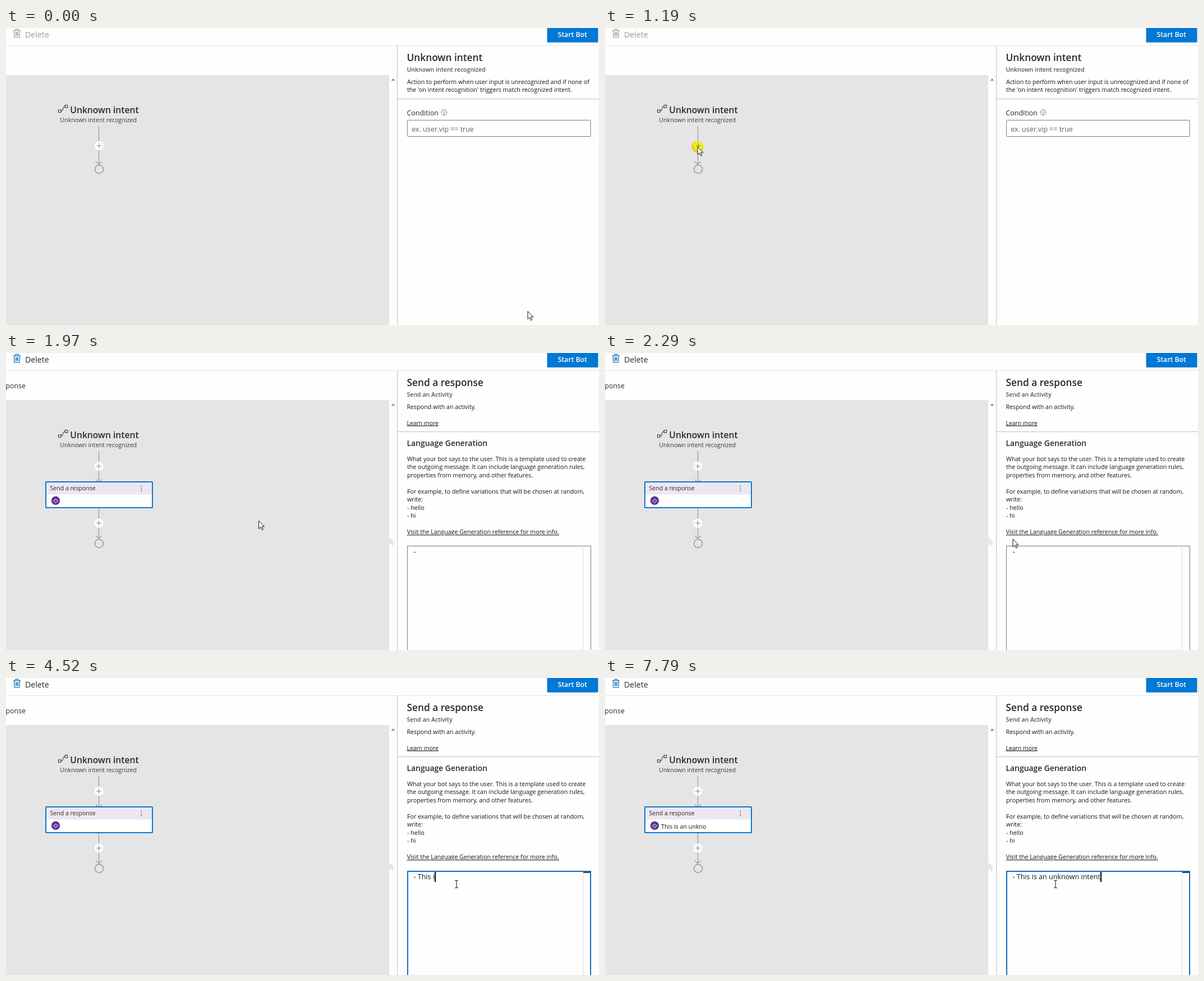
Recreate the animation shown at these times as an HTML page. Size 1057 by 530 pixels, loop 8000 ms.

```html
<!DOCTYPE html>
<html lang="en">
<head>
<meta charset="utf-8">
<title>Bot flow editor</title>
<style>
  html, body { margin: 0; width: 100%; height: 100%; overflow: hidden; background: #fefefe; }
  body { position: relative; font-family: "Open Sans", "Noto Sans", sans-serif; }
  svg { position: absolute; left: 0; top: 0; display: block; }
  text { fill: #292827; }
  .small { font-size: 10.68px; fill: #161514; }
  .sub { font-size: 10.55px; font-weight: 600; fill: #55534f; }
  .head { font-size: 17.3px; font-weight: 600; }
  .body { font-size: 12.45px; }
  .link { text-decoration: underline; }
  .wire { fill: none; stroke: #979797; stroke-width: 1.2; }
  .icon { fill: none; stroke: #3b3a39; stroke-width: 1.1; }
  .rule { stroke: #c2c0be; }
  #delete { --ink: #9c9a98; --mark: #a3a19f; }
  #delete.on { --ink: #292827; --mark: #1a73c4; }
  #delete text { fill: var(--ink); font-size: 14.1px; }
  #delete path { fill: none; stroke: var(--mark); stroke-width: 1.3; }
  #menu .box { filter: drop-shadow(0 3px 4px rgba(0, 0, 0, .22)); }
  #line {
    position: absolute; left: 726.5px; top: 346px; height: 18px;
    font-size: 12.5px; line-height: 18px; white-space: pre; color: #161514;
  }
  #caret { position: absolute; top: 0; width: 2px; height: 18px; background: #000; }
  #click { fill: #f6ef1e; mix-blend-mode: multiply; }
  .pointer { fill: #fff; stroke: #111; stroke-width: 1; stroke-linejoin: round; }
  .off { display: none; }
</style>
</head>
<body>
<svg width="1057" height="530" viewBox="0 0 1057 530">
  <defs>
    <g id="plus">
      <circle r="8" fill="#fff"/>
      <path d="M-4.5 0H4.5M0 -4.5V4.5" stroke="#5b8fc6"/>
    </g>
    <g id="end" class="wire">
      <path d="M-6 -14L-.5 -9L5 -14"/>
      <circle r="7.5" stroke-width="1.5"/>
    </g>
    <path id="arrow" d="M0 0V14L3.3 11L5.6 16.2L7.8 15.2L5.6 10.2H10Z"/>
  </defs>

  <!-- toolbar -->
  <g id="delete">
    <path d="M13 4.6H26M17 4.4V2.4H22V4.4M14.5 4.8L15 16.6H24L24.5 4.8M17.6 7.3V14M19.5 7.3V14M21.4 7.3V14"/>
    <text x="34" y="17">Delete</text>
  </g>
  <rect x="964.5" y="-2" width="91" height="27.8" rx="1" fill="#0078d4"/>
  <text x="983.5" y="16.3" font-size="12.25" font-weight="600" style="fill:#fff">Start Bot</text>
  <path d="M0 31.5H1057" stroke="#e3e2e1"/>

  <!-- canvas -->
  <rect y="84" width="683" height="446" fill="#e5e5e5"/>
  <path d="M686.5 94L690 90L693.5 94Z" fill="#8a8a8a"/>
  <path d="M697.5 31V530" class="rule"/>
  <g class="icon">
    <rect x="93.5" y="146" width="4.5" height="4.5"/>
    <rect x="105.2" y="137.7" width="4.5" height="4.5"/>
    <path d="M98 148.2C103.5 148.2 99.5 140 105 140"/>
  </g>
  <text x="114.3" y="152" font-size="15.7" font-weight="600">Unknown intent</text>
  <text x="96.3" y="167.5" class="small" style="fill:#3b3a39">Unknown intent recognized</text>

  <g id="before">
    <path class="wire" d="M165.5 175V243"/>
    <use href="#plus" x="166" y="210"/>
    <use href="#end" x="166" y="252"/>

    <text class="head" x="714.5" y="59">Unknown intent</text>
    <text class="sub" x="714.5" y="78">Unknown intent recognized</text>
    <text class="small" y="99.5">
      <tspan x="715">Action to perform when user input is unrecognized and if none of</tspan>
      <tspan x="715" dy="14.5">the 'on intent recognition' triggers match recognized intent.</tspan>
    </text>
    <path d="M698 126.5H1057" class="rule"/>
    <text class="body" x="714.5" y="155.5">Condition</text>
    <circle cx="781" cy="150.5" r="4.9" class="icon" style="stroke:#605e5c;stroke-width:.9"/>
    <text x="781" y="153.5" font-size="8" text-anchor="middle">?</text>
    <rect x="715.5" y="164.5" width="326.5" height="29" rx="1" fill="#fff" stroke="#7d7b79"/>
    <text class="body" x="723.3" y="185" style="fill:#605e5c">ex. user.vip == true</text>
  </g>

  <g id="after">
    <text x="-.5" y="63" font-size="12.3">ponse</text>
    <path class="wire" d="M165.5 175V230M160 226L165.5 231L171 226M165.5 277V331"/>
    <use href="#plus" x="165.5" y="202"/>
    <use href="#plus" x="165.5" y="303.5"/>
    <use href="#end" x="166" y="340"/>
    <rect x="71" y="230" width="190" height="46" fill="#fff"/>
    <rect x="71" y="230" width="190" height="22.5" fill="#ebe8f3"/>
    <rect x="71" y="230" width="190" height="46" rx="1" fill="none" stroke="#0f76cb" stroke-width="2"/>
    <text x="78.5" y="245.3" font-size="10.55">Send a response</text>
    <g fill="#484644">
      <circle cx="241.3" cy="237.7" r=".9"/><circle cx="241.3" cy="241.6" r=".9"/><circle cx="241.3" cy="245.5" r=".9"/>
    </g>
    <circle cx="88.5" cy="263.4" r="7.7" fill="#5c2d91"/>
    <path d="M85.8 261.7H91.2V265.7H85.8ZM84.2 262.7V264.7M92.8 262.7V264.7M88.5 261.7V259.2M87 267.7H90" fill="none" stroke="#d9cce8" stroke-width=".9"/>
    <text id="reply" class="small" x="100" y="268.5">This is an unkno</text>
    <use href="#arrow" x="683.5" y="329" fill="#e4e4e4"/>

    <text class="head" x="714.5" y="59">Send a response</text>
    <text class="sub" x="714.5" y="78">Send an Activity</text>
    <text class="small" x="714.5" y="99.5">Respond with an activity.</text>
    <text class="small link" x="714.5" y="128.5" style="font-size:10.45px">Learn more</text>
    <path d="M698 140.5H1057" class="rule"/>
    <text x="714.5" y="166.3" font-size="13.9" font-weight="600">Language Generation</text>
    <text class="small" y="192.5">
      <tspan x="715">What your bot says to the user. This is a template used to create</tspan>
      <tspan x="715" dy="14.5">the outgoing message. It can include language generation rules,</tspan>
      <tspan x="715" dy="14.5">properties from memory, and other features.</tspan>
      <tspan x="715" dy="29.2">For example, to define variations that will be chosen at random,</tspan>
      <tspan x="715" dy="14.5">write:</tspan>
      <tspan x="715" dy="14.5">- hello</tspan>
      <tspan x="715" dy="14.5">- hi</tspan>
    </text>
    <text class="small link" x="714.8" y="323.3">Visit the Language Generation reference for more info.</text>
    <path d="M1028.5 346V530" stroke="#dedede"/>
    <rect id="idle" x="715.5" y="344.5" width="327" height="200" fill="none" stroke="#7d7b79"/>
    <g id="focus">
      <rect x="716" y="345" width="326" height="200" fill="none" stroke="#0f6cbd" stroke-width="2"/>
      <path d="M1029 347H1041" stroke="#444" stroke-width="2"/>
    </g>
  </g>

  <g id="menu">
    <rect class="box" x="159" y="217" width="177" height="272" fill="#fff"/>
    <rect id="hover" x="159" y="251" width="177" height="34.5" fill="#edebe9"/>
    <path d="M170 229.5H167.5V240H171M174.5 229.5H176.5V232M170 228.3H174.5V231H170ZM171.5 232.5H177.8V241H171.5Z" class="icon" style="stroke:#b0aeac"/>
    <text x="182" y="240" font-size="12" style="fill:#a9a7a5">Paste</text>
    <g id="items" class="body"></g>
  </g>
</svg>

<div id="line"><span id="typed"></span><i id="caret"></i></div>

<svg id="click" width="1057" height="530"><circle r="10.5"/></svg>
<svg width="1057" height="530">
  <g id="cursor">
    <use id="point" href="#arrow" class="pointer"/>
    <path id="hand" class="pointer" d="M-1.5 11V1.2a1.5 1.5 0 0 1 3 0V7c0 -1.2 2.6 -1.2 2.8 .3c.2 -1.2 2.5 -1 2.7 .5c.3 -1 2.3 -.8 2.3 .8V13c0 2 -1.5 3 -1.5 5.5H1C.5 16 -4.5 12.5 -5 10c-.3 -1.4 1.4 -2 2.2 -.8Z"/>
    <path id="beam" d="M-3 -6.5H-1L0 -5.5L1 -6.5H3M0 -5.5V5.5M-3 6.5H-1L0 5.5L1 6.5H3" fill="none" stroke="#222" stroke-width="1.1"/>
  </g>
</svg>

<script>
const LOOP = 8000;
const $ = id => document.getElementById(id);
const show = (id, on) => $(id).classList.toggle('off', !on);
const within = (t, spans) => spans.some(([a, b]) => t >= a && t < b);

const items = ['Send a response', 'Ask a question', 'Create a condition', 'Dialog management',
  'Manage properties', 'Access external resources', 'Debugging options'];
$('items').innerHTML = items.map((name, i) => {
  const y = 269.6 + i * 33.9;
  const chevron = i ? `<path class="icon" d="M319.5 ${y - 6.5}l6 5.5l-6 5.5" style="stroke:#6f6d6b"/>` : '';
  return `<text x="165.5" y="${y + 4.6}">${name}</text>${chevron}`;
}).join('');

// Pointer legs: start, time per step, steps, destination
const home = [930, 505.5];
const legs = [
  [70, 75, 11, [162, 212]],
  [900, 75, 1, [165, 212]],
  [1280, 75, 5, [217, 270]],
  [1810, 80, 6, [684, 329]],
  [2290, 80, 1, [727, 332]],
  [2370, 77, 4, [803, 368]]
];
const ease = p => p * p * (3 - 2 * p);

function pointer(t) {
  let pos = home;
  for (const [start, step, count, to] of legs) {
    if (t < start) break;
    const p = ease(Math.min(1, (Math.floor((t - start) / step) + 1) / count));
    pos = pos.map((v, i) => v + (to[i] - v) * p);
  }
  return pos;
}

const phrase = 'This is an unknown intent';
const keys = [3670, 3750, 3830, 4210, 4380, 4520, 4690, 4840, 4990, 5070, 5150, 5530, 5700,
  5850, 6000, 6170, 6870, 7020, 7100, 7330, 7480, 7560, 7640, 7640, 7790];
const caretOn = [[2760, 3300], [3670, 6720], [6870, LOOP]];
const clicks = [[1130, 1280], [1650, 1890], [2680, 2830]];

function draw(t) {
  const sent = t >= 1970;
  show('before', !sent);
  show('after', sent);
  $('delete').classList.toggle('on', sent);
  show('menu', t >= 1200 && t < 1890);
  $('menu').style.opacity = Math.min(1, .55 + (t - 1200) / 330);
  show('hover', t >= 1430);
  show('idle', t < 2760);
  show('focus', t >= 2760);
  show('reply', t >= 6800);

  show('line', sent);
  $('typed').textContent = '- ' + phrase.slice(0, keys.filter(k => k <= t).length);
  show('caret', within(t, caretOn));

  const move = `translate(${pointer(t).map(v => v.toFixed(1))})`;
  const hand = t >= 1430 && t < 1890;
  const beam = t >= 2370;
  $('cursor').setAttribute('transform', move);
  $('click').firstElementChild.setAttribute('transform', move);
  show('click', within(t, clicks));
  show('hand', hand);
  show('beam', beam);
  show('point', !hand && !beam);
}

const begin = performance.now();
function tick() {
  draw((performance.now() - begin) % LOOP);
  requestAnimationFrame(tick);
}
tick();
</script>
</body>
</html>
```
